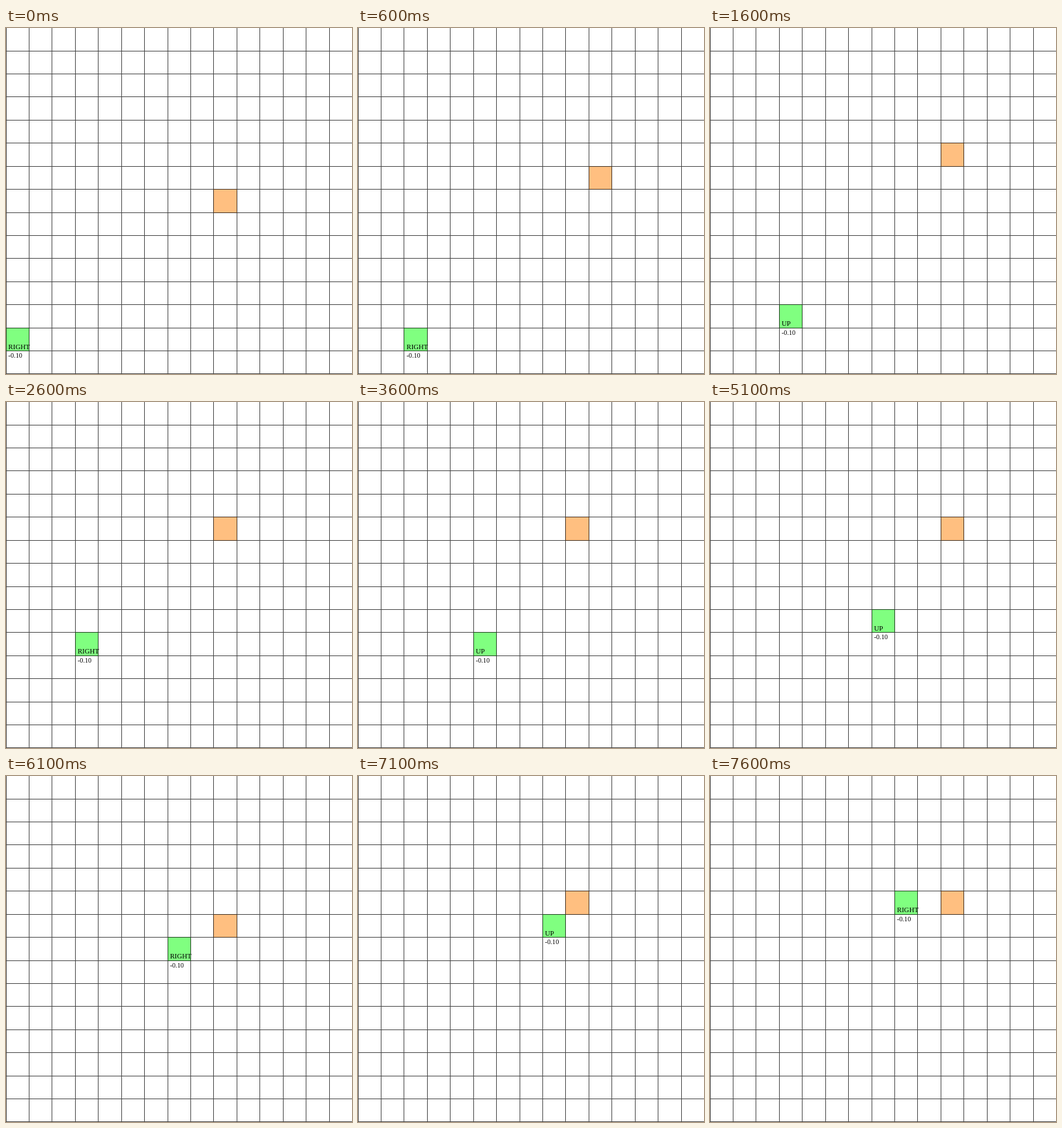
These frames come from a looping animation (531 px wide and 531 px high, 8 s). An HTML page with a canvas:

```html
<!DOCTYPE html>
<html lang="en">
<head>
<meta charset="utf-8">
<title>Grid chase</title>
<style>
  html, body { margin: 0; width: 100%; height: 100%; overflow: hidden; background: #fff; }
  canvas { display: block; }
</style>
</head>
<body>
<canvas id="stage" width="531" height="531"></canvas>
<script>
const ctx = document.getElementById("stage").getContext("2d");
const SIZE = 531, CELLS = 15, PITCH = 35.433;
const LOOP = 8000, FIRST_HOLD = 100, STEP = 500;

const lineX = i => Math.floor(i * PITCH);
const lineY = i => Math.min(SIZE - 1, Math.floor(i * PITCH - 0.4));

// The goal wanders at random; "." means it stays.
const goalMoves = "RU.UL.DURDULD.UR";
const offsets = { R: [1, 0], L: [-1, 0], U: [0, -1], D: [0, 1], ".": [0, 0] };
const move = ([x, y], key) => [x + offsets[key][0], y + offsets[key][1]];

// The agent reduces the larger distance, preferring UP on a tie.
const chooseAction = (agent, goal) =>
  goal[0] - agent[0] > agent[1] - goal[1] ? "RIGHT" : "UP";

function buildStates() {
  let agent = [0, 13], goal = [9, 7];
  const states = [];
  for (const key of goalMoves + ".") {
    const action = chooseAction(agent, goal);
    states.push({ agent, goal, action });
    agent = move(agent, action[0]);
    goal = move(goal, key);
  }
  return states;
}
const states = buildStates();

function fillCell([col, row], color) {
  const x = lineX(col), y = lineY(row);
  ctx.fillStyle = color;
  ctx.fillRect(x, y, lineX(col + 1) - x + 1, lineY(row + 1) - y + 1);
}

function drawGrid() {
  ctx.fillStyle = "rgba(0, 0, 0, 0.72)";
  ctx.beginPath();
  for (let i = 0; i <= CELLS; i++) {
    ctx.rect(lineX(i), 0, 1, SIZE);
    if (i > 0) ctx.rect(0, lineY(i), SIZE, 1);
  }
  ctx.fill();
}

function drawLabel([col, row], action) {
  const x = col * PITCH + 3.6, y = row * PITCH - 0.5;
  const write = (text, size, dy) => {
    ctx.font = `${size}px "Liberation Serif", serif`;
    ctx.fillText(text, x, y + dy);
  };
  ctx.fillStyle = "#000";
  write(action, 10.8, 32.6);
  write("-0.10", 10.2, 46);
}

function draw(time) {
  const index = time < FIRST_HOLD ? 0 : 1 + Math.floor((time - FIRST_HOLD) / STEP);
  const { agent, goal, action } = states[index];
  ctx.fillStyle = "#fff";
  ctx.fillRect(0, 0, SIZE, SIZE);
  fillCell(goal, "#ffbf80");
  fillCell(agent, "#80ff80");
  drawGrid();
  drawLabel(agent, action);
}

const start = performance.now();
function tick() {
  draw((performance.now() - start) % LOOP);
  requestAnimationFrame(tick);
}
tick();
</script>
</body>
</html>
```
